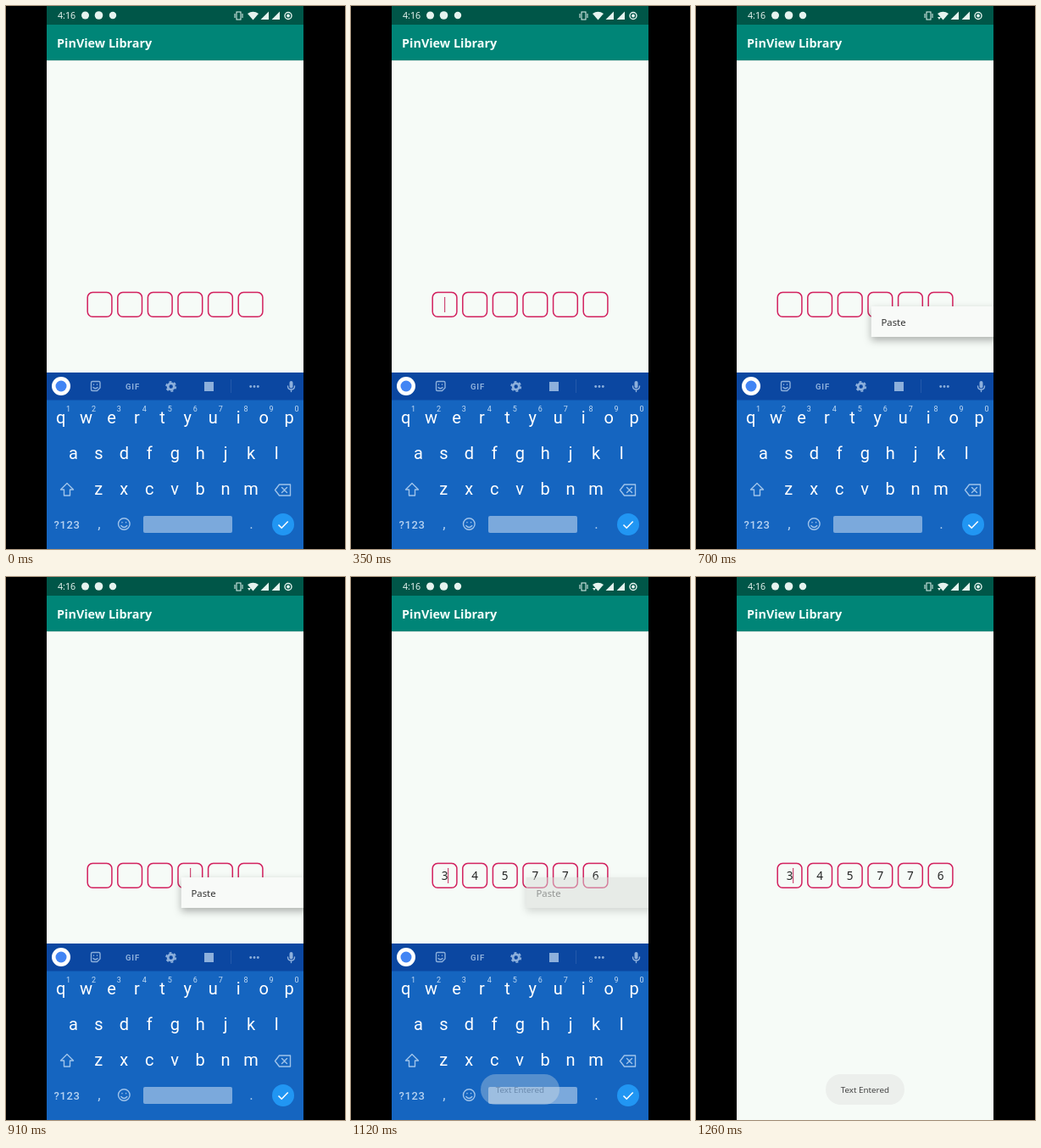
An HTML page that plays this animation: 400 px wide and 640 px high, repeating every 1330 ms.

```html
<!DOCTYPE html>
<html lang="en">
<head>
<meta charset="utf-8">
<title>Pin entry</title>
<style>
  html, body { margin: 0; width: 100%; height: 100%; overflow: hidden; background: #000; }
  #stage { display: block; width: 100vw; height: 100vh; }
  text { font-family: "Noto Sans", sans-serif; }
  #keyboard text { font-family: Roboto, sans-serif; text-anchor: middle; }
  .letter { font-size: 20px; fill: #fff; }
  .hint { font-size: 9px; fill: #c3dbf3; }
  .line { fill: none; stroke: #9fc3ea; stroke-width: 1.4; stroke-linejoin: round; stroke-linecap: round; }
  .tool { fill: #8db0dc; }
  .toolLine { fill: none; stroke: #8db0dc; stroke-width: 1.4; stroke-linecap: round; }
  #boxes { fill: none; stroke: #d2205e; stroke-width: 1.5; }
  #digits { font-size: 13.5px; fill: #222; text-anchor: middle; }
  #popup { filter: drop-shadow(0 4px 5px rgba(0, 0, 0, .3)); }
</style>
</head>
<body>
<svg id="stage" viewBox="0 0 400 640">
  <clipPath id="screen"><rect x="48" width="303" height="640"/></clipPath>
  <rect width="400" height="640"/>
  <g clip-path="url(#screen)">
    <rect x="48" width="303" height="640" fill="#f6fbf7"/>
    <rect x="48" y="64" width="303" height="1" fill="#d5e0dc"/>
    <rect x="48" y="22" width="303" height="42" fill="#008577"/>
    <rect x="48" width="303" height="22" fill="#005648"/>
    <text x="60" y="49" font-size="14.4" font-weight="600" fill="#f4fffc">PinView Library</text>

    <g fill="#e6f3ef">
      <text x="61" y="15" font-size="10.7">4:16</text>
      <circle cx="93.5" cy="11" r="4.5"/>
      <circle cx="109.500" cy="11" r="4.8"/>
      <circle cx="126" cy="11" r="4.2"/>
      <path d="M285 9Q291.500 4.500 298 9L291.500 16.500Z"/>
      <path id="activity" d="M285 13h4l-2 3z"/>
      <path d="M310 6.500V16H300.500ZM323 6.500V16H313.500Z"/>
      <circle cx="333" cy="11.500" r="1.900"/>
      <g fill="none" stroke="#e6f3ef">
        <circle cx="333" cy="11.500" r="4" stroke-width="1.400"/>
        <rect x="272" y="7" width="5" height="9"/>
        <path d="M270 9v5M279 9v5"/>
      </g>
    </g>

    <g id="boxes"></g>
    <g id="digits"></g>
    <rect id="cursor" y="343" width="1.200" height="18" fill="#cf4a75"/>

    <g id="popup">
      <svg id="menu">
        <rect id="menuFill" width="100%" height="100%"/>
        <text id="menuText" font-size="11.3" fill="#333">Paste</text>
      </svg>
    </g>

    <g id="keyboard">
      <rect x="48" y="432" width="303" height="208" fill="#1565c0"/>
      <rect x="48" y="432" width="303" height="32.500" fill="#0b47a1"/>
      <circle cx="65" cy="448" r="11" fill="#fff"/>
      <circle cx="65" cy="448" r="6.500" fill="#4285f4"/>
      <g class="toolLine">
        <path d="M102 442.500h7.500q1.500 0 1.500 1.500v6l-3.500 3.500h-5.500q-1.500 0-1.500-1.500v-8q0-1.500 1.500-1.500zM103 449.500q2.500 2.500 5 0M103.500 446v.2M107.500 446v.2"/>
        <circle cx="194.700" cy="448.500" r="3.600" stroke-width="2.800"/>
        <circle cx="194.700" cy="448.500" r="5.600" stroke-width="1.800" stroke-linecap="butt" stroke-dasharray="2.930"/>
        <path d="M332.500 448q0 4 4 4t4-4M336.500 452v2.500"/>
      </g>
      <g class="tool">
        <text x="149.500" y="451.700" font-size="9.500" font-weight="700" letter-spacing=".8">GIF</text>
        <rect x="234" y="443" width="11" height="11"/>
        <circle cx="288.700" cy="448.500" r="1.400"/>
        <circle cx="293" cy="448.500" r="1.400"/>
        <circle cx="297.300" cy="448.500" r="1.400"/>
        <rect x="334.500" y="442" width="4" height="8.500" rx="2"/>
      </g>
      <path d="M265.500 440v16" stroke="#2459aa"/>
      <g id="keys"></g>
      <g class="line">
        <path d="M72 562.500l7.500 7.500h-4v7h-7v-7h-4z"/>
        <path d="M322.500 564h13v13h-13l-5-6.500zM325.500 567.500l6 6M331.500 567.500l-6 6"/>
        <circle cx="139.300" cy="610.500" r="6.800"/>
        <path d="M135.800 612.500q3.500 4 7 0M137 608.500v.2M141.600 608.500v.2"/>
      </g>
      <g fill="#b5d2f1">
        <text x="72" y="615.500" font-size="13" font-weight="500" letter-spacing=".6">?123</text>
        <text x="110" y="616" font-size="17">,</text>
        <text x="289.500" y="616" font-size="17">.</text>
      </g>
      <rect x="162" y="601" width="105" height="20" rx="2" fill="#7ba9dc"/>
      <circle cx="327" cy="611" r="13" fill="#2196f3"/>
      <path d="M321.500 611.500l3.700 3.700 7.500-7.700" fill="none" stroke="#fff" stroke-width="1.600"/>
    </g>

    <g id="toast">
      <rect x="153" y="586" width="93" height="36" rx="18" fill="#ecefec"/>
      <text x="199.300" y="608" font-size="9.800" fill="#444" text-anchor="middle">Text Entered</text>
    </g>
  </g>
</svg>
<script>
const $ = id => document.getElementById(id);
const set = (el, attrs) => Object.entries(attrs).forEach(([k, v]) => el.setAttribute(k, v));
const add = (parent, tag, attrs, text = "") => {
  const el = document.createElementNS("http://www.w3.org/2000/svg", tag);
  set(el, attrs);
  el.textContent = text;
  parent.append(el);
};

[..."345776"].forEach((digit, i) => {
  const x = 96.2 + 35.6 * i;
  add($("boxes"), "rect", { x, y: 337.6, width: 28.7, height: 28.7, rx: 6 });
  add($("digits"), "text", { x: x + 14.3, y: 357 }, digit);
});

[["qwertyuiop", 64.6, 492], ["asdfghjkl", 79.5, 534], ["zxcvbnm", 109.3, 576]].forEach(([row, x, y]) =>
  [...row].forEach((key, i) => add($("keys"), "text", { x: x + 29.95 * i, y, class: "letter" }, key)));
[..."1234567890"].forEach((n, i) =>
  add($("keys"), "text", { x: 73.5 + 29.95 * i, y: 478, class: "hint" }, n));

// Each state holds from its start time; omitted parts are hidden.
const menu = (x, y, w, h, textX, textY, opacity, fill = "#f8faf8") => ({ x, y, w, h, textX, textY, opacity, fill });
const openMenu = menu(206.5, 354, 150, 36, 12, 23, 1);
const states = [
  { at: 0 },
  { at: 70, cursor: 110 },
  { at: 280 },
  { at: 350, cursor: 110 },
  { at: 560, cursor: 217, menu: menu(204, 339, 77, 34.5, -22.5, 21, .45, "#e9ebe9") },
  { at: 630, cursor: 217, menu: menu(205.5, 350, 150, 36, 9, 23, .85) },
  { at: 700, menu: openMenu },
  { at: 910, cursor: 217, menu: openMenu },
  { at: 1050, cursor: 217, menu: { ...openMenu, fill: "#e4e6e4" } },
  { at: 1120, cursor: 114, digits: 1, menu: { ...openMenu, opacity: .5, fill: "#d9dcd9" }, toast: .3 },
  { at: 1190, cursor: 114, digits: 1, toast: .85, keyboard: .17, slide: 41.5 },
  { at: 1260, cursor: 114, digits: 1, toast: 1, keyboard: 0 }
];

function draw(now) {
  const time = now % 1330;
  const { at, cursor, digits = 0, menu: m, toast = 0, keyboard = 1, slide = 0 } =
    states.findLast(state => state.at <= time);
  set($("cursor"), { x: cursor || 0, opacity: cursor ? 1 : 0 });
  set($("digits"), { opacity: digits });
  set($("toast"), { opacity: toast });
  set($("keyboard"), { opacity: keyboard, transform: `translate(0 ${slide})` });
  set($("activity"), { opacity: at >= 700 ? 1 : 0 });
  set($("popup"), { opacity: m ? m.opacity : 0 });
  if (m) {
    set($("menu"), { x: m.x, y: m.y, width: m.w, height: m.h });
    set($("menuFill"), { fill: m.fill });
    set($("menuText"), { x: m.textX, y: m.textY });
  }
  requestAnimationFrame(draw);
}
const start = performance.now();
requestAnimationFrame(function begin() {
  draw(performance.now() - start);
});
</script>
</body>
</html>
```
